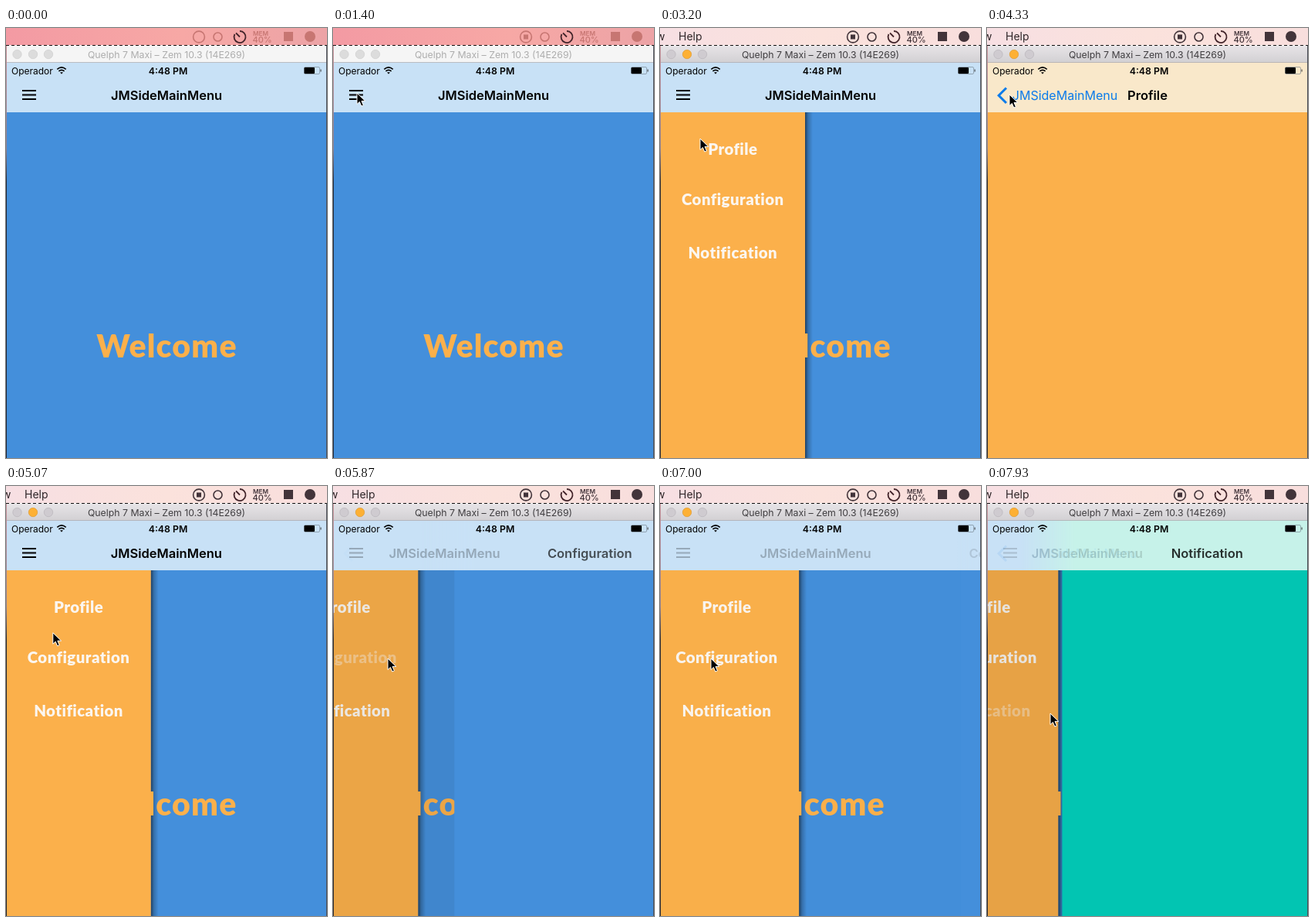
An HTML page for the animation above (8000 ms loop, 416x556 px).

```html
<!DOCTYPE html>
<html lang="en">
<head>
<meta charset="utf-8">
<title>Side menu demo</title>
<style>
  html, body { margin: 0; width: 100%; height: 100%; overflow: hidden; }
  svg { display: block; width: 416px; height: 556px; font-family: Inter, "Open Sans", sans-serif; }
  .mid { text-anchor: middle; }
  .heavy { font-family: Lato, sans-serif; font-weight: 900; }
  .hero { font-size: 41px; letter-spacing: 1.2px; fill: #fbb04b; }
  .item { font-size: 20.4px; letter-spacing: .45px; fill: #fbf6f0; }
  .nav { font-size: 16.5px; font-weight: 600; }
  .back { font-size: 16px; fill: #0a7bea; }
</style>
</head>
<body>
<svg viewBox="0 0 416 556">
  <defs>
    <linearGradient id="sleepBar"><stop stop-color="#f39aa3"/><stop offset=".55" stop-color="#f7a8a5"/><stop offset="1" stop-color="#eca3a6"/></linearGradient>
    <linearGradient id="wakeBar"><stop stop-color="#f7dfe3"/><stop offset=".5" stop-color="#fbe2dc"/><stop offset="1" stop-color="#f8dedd"/></linearGradient>
    <linearGradient id="chrome" x2="0" y2="1"><stop stop-color="#e8e5e8"/><stop offset="1" stop-color="#d2d0d3"/></linearGradient>
    <linearGradient id="shade"><stop stop-opacity=".55"/><stop offset=".4" stop-opacity=".22"/><stop offset="1" stop-opacity="0"/></linearGradient>
    <linearGradient id="side" x2="0" y2="1"><stop stop-color="#c58f97"/><stop offset=".25" stop-color="#8d7f90"/><stop offset=".33" stop-color="#20232f"/><stop offset="1" stop-color="#20232f"/></linearGradient>
    <linearGradient id="soft"><stop stop-color="#fff" stop-opacity="0"/><stop offset=".14" stop-color="#fff"/></linearGradient>
    <mask id="softEdge" maskUnits="userSpaceOnUse" x="-70" y="44" width="500" height="65"><rect x="-70" y="44" width="500" height="65" fill="url(#soft)"/></mask>
    <clipPath id="screen"><rect x="1" y="109" width="414" height="447"/></clipPath>
    <clipPath id="barClip"><rect x="1" y="44" width="414" height="65"/></clipPath>
  </defs>

  <g clip-path="url(#screen)">
    <g id="home">
      <rect y="109" width="550" height="447" fill="#448fdb"/>
      <rect id="menuShade" x="188" y="109" width="10" height="447" fill="url(#shade)"/>
      <text class="heavy mid hero" x="208.5" y="426">Welcome</text>
      <g id="menu">
        <rect x="-20" y="109" width="208" height="447" fill="#fbb04b"/>
        <text class="heavy mid item" x="94.3" y="164">Profile</text>
        <text class="heavy mid item" x="94.3" y="229">Configuration</text>
        <text class="heavy mid item" x="94.3" y="298">Notification</text>
      </g>
    </g>
    <rect id="dim" y="109" width="416" height="447" opacity="0"/>
    <rect id="page" y="109" width="416" height="447"/>
  </g>

  <g clip-path="url(#barClip)">
    <rect y="44" width="416" height="65" fill="#c8e1f6"/>
    <rect id="tint" x="-70" y="44" width="500" height="65" mask="url(#softEdge)"/>
    <path id="burger" d="M21 81h18M21 86.5h18M21 92h18" stroke="#000" stroke-width="2"/>
    <path id="chevron" d="M25 77.5L15.2 87.3L25 97" fill="none" stroke="#0a7bea" stroke-width="3"/>
    <text id="homeTitle" class="mid nav" y="93">JMSideMainMenu</text>
    <text id="backLabel" class="mid back" y="93">JMSideMainMenu</text>
    <text id="pageTitle" class="mid nav" y="93"></text>
  </g>

  <g font-size="12">
    <text x="7" y="59.5">Operador</text>
    <g fill="none" stroke="#000" stroke-width="1.6">
      <path d="M66.3 53.3q5.7-4.8 11.4 0M68.4 55.8q3.6-3 7.2 0"/>
      <path d="M70.6 57.6h2.8l-1.4 1.6z" fill="#000" stroke-width=".6"/>
    </g>
    <text class="mid" x="210" y="59.7" font-size="12.3" font-weight="600">4:48 PM</text>
    <rect x="386.5" y="50.5" width="20" height="9" rx="1.5" fill="none" stroke="#6f7d89" stroke-width=".6"/>
    <rect x="386.5" y="51" width="13.5" height="8" rx="1"/>
    <path d="M408 53.5v3" stroke="#333"/>
  </g>

  <rect id="titleBar" x="1" y="22" width="414" height="22.5"/>
  <path d="M1 44.5h414" stroke="#aaa8ac" stroke-width=".7"/>
  <g id="lights" stroke-width=".7">
    <circle cx="14.5" cy="34" r="5.7"/><circle cx="35" cy="34" r="5.7"/><circle cx="55" cy="34" r="5.7"/>
  </g>
  <text id="winTitle" class="mid" x="208" y="38.6" font-size="12.3">Quelph 7 Maxi – Zem 10.3 (14E269)</text>

  <rect id="menuBar" width="416" height="22"/>
  <g id="helpText" font-size="14" fill="#2f2629"><text x="-5" y="16">w</text><text x="24" y="16">Help</text></g>
  <g id="icons">
    <g fill="none" stroke="currentColor" stroke-width="1.6">
      <circle cx="250" cy="11.5" r="7.4"/><circle cx="274.5" cy="11.5" r="5.5"/>
    </g>
    <rect id="stop" x="247" y="8.5" width="6" height="6" fill="currentColor"/>
    <g fill="currentColor">
      <text x="320" y="10" font-size="8.2" font-weight="600">MEM</text>
      <text x="319.5" y="19.2" font-size="11" font-weight="500">40%</text>
      <rect x="360" y="5" width="12" height="12"/><circle cx="394" cy="11" r="7"/>
    </g>
  </g>
  <path d="M303 4a7.5 7.5 0 1 1-6.6 4M303 11.5l-5-5" fill="none" stroke="#42242a" stroke-width="1.8"/>
  <path d="M0 22.5h416" stroke="#fff"/>
  <path d="M0 22.5h416" stroke="#111" stroke-dasharray="4 3"/>
  <path d="M.4 23v533M415.6 23v533" fill="none" stroke="#20232f" stroke-width=".9"/>
  <rect y="23" width="1" height="533" fill="url(#side)"/>

  <path id="cursor" d="M0 0v14.5l3.4-3.1 2.4 5.6 2.6-1.1-2.4-5.5h4.8z" stroke="#fff" stroke-width="1"/>
</svg>
<script>
const LOOP = 8000, WAKE = 2560, MENU_OPEN = 2680;
const $ = id => document.getElementById(id);
const items = [...document.querySelectorAll('.item')];
const lights = [...$('lights').children];
const clamp = v => Math.max(0, Math.min(1, v));
const show = (el, alpha) => el.setAttribute('opacity', clamp(alpha));
const move = (el, x, y = 0) => el.setAttribute('transform', `translate(${x} ${y})`);
const smooth = v => v * v * (3 - 2 * v);

// Critically damped spring, 0 to 1.
const spring = ms => {
  const k = Math.max(0, ms) * 0.013;
  return 1 - (1 + k) * Math.exp(-k);
};

const visits = [
  { name: 'Profile', page: '#fbb04b', bar: '#f9e8ca', push: 3540, pop: 4420 },
  { name: 'Configuration', page: '#448fdb', bar: '#c8e1f6', push: 5709, pop: 6658 },
  { name: 'Notification', page: '#02c5b2', bar: '#c6f2e9', push: 7717, pop: LOOP }
];

// time, x, y of the pointer tip
const pointer = [
  [500, -14, 180], [1250, 31, 84], [2750, 31, 84], [3200, 52, 143], [3450, 70, 153],
  [3650, 70, 153], [4230, 29, 86], [4480, 29, 86], [5350, 71, 223], [5900, 71, 223],
  [6500, 29, 86], [6680, 29, 86], [7000, 66, 223], [7450, 82, 294], [LOOP, 82, 294]
];

function pointerAt(t) {
  const i = pointer.findIndex(p => p[0] > t);
  if (i < 1) return pointer[0].slice(1);
  const [a, b] = [pointer[i - 1], pointer[i]];
  const k = smooth((t - a[0]) / (b[0] - a[0]));
  return [a[1] + (b[1] - a[1]) * k, a[2] + (b[2] - a[2]) * k];
}

function drawDesktop(t) {
  const awake = t >= WAKE;
  $('menuBar').setAttribute('fill', `url(#${awake ? 'wakeBar' : 'sleepBar'})`);
  $('titleBar').setAttribute('fill', awake ? 'url(#chrome)' : '#f5f5f5');
  $('winTitle').setAttribute('fill', awake ? '#403e41' : '#adadad');
  $('icons').style.color = awake ? '#42343a' : '#c77672';
  show($('helpText'), awake ? 1 : 0);
  show($('stop'), t > 200 ? 1 : 0);
  lights.forEach((dot, i) => {
    const amber = awake && i === 1;
    dot.setAttribute('fill', amber ? '#fdb034' : awake ? '#cfcbd0' : '#dcdcdc');
    dot.setAttribute('stroke', amber ? '#df9a30' : awake ? '#b9b5ba' : '#cfcfcf');
  });
}

function drawApp(t) {
  const visit = visits.filter(v => t >= v.push).pop();
  const popping = visit && t >= visit.pop;
  const since = visit ? t - (popping ? visit.pop : visit.push) : 0;
  let p = visit ? spring(since) : 0;
  if (popping) p = 1 - p;
  if (p > 0.998) p = 1;
  const edge = 416 * (1 - p);

  const menuX = -200 * (1 - smooth(clamp((t - MENU_OPEN) / 330)));
  move($('menu'), menuX);
  move($('menuShade'), menuX);
  move($('home'), -125 * p);
  show($('dim'), 0.1 * p);
  move($('page'), edge);
  move($('tint'), edge + 70 * (1 - p));
  items.forEach((el, i) => {
    const v = visits[i];
    show(el, t > v.push - 80 && t < v.push + 600 ? 0.42 : 1);
  });

  const homeAlpha = popping ? (since - 260) / 340 : 1 - p ** 0.6;
  const backAlpha = popping ? 1 - since / 250 : p ** 9;
  const titleAlpha = popping ? 1 - since / 390 : p * 1.05;
  show($('burger'), homeAlpha);
  show($('homeTitle'), homeAlpha);
  show($('chevron'), backAlpha);
  show($('backLabel'), backAlpha);
  show($('pageTitle'), visit ? titleAlpha : 0);
  move($('homeTitle'), 208 - 102 * p);
  move($('backLabel'), 208 - 107 * p);
  move($('pageTitle'), 208 + (popping ? 264 : 330) * (1 - p));
  if (visit) {
    $('page').setAttribute('fill', visit.page);
    $('tint').setAttribute('fill', visit.bar);
    $('pageTitle').textContent = visit.name;
  }
}

const start = performance.now();
function frame() {
  const t = (performance.now() - start) % LOOP;
  drawDesktop(t);
  drawApp(t);
  move($('cursor'), ...pointerAt(t));
  requestAnimationFrame(frame);
}
frame();
</script>
</body>
</html>
```
